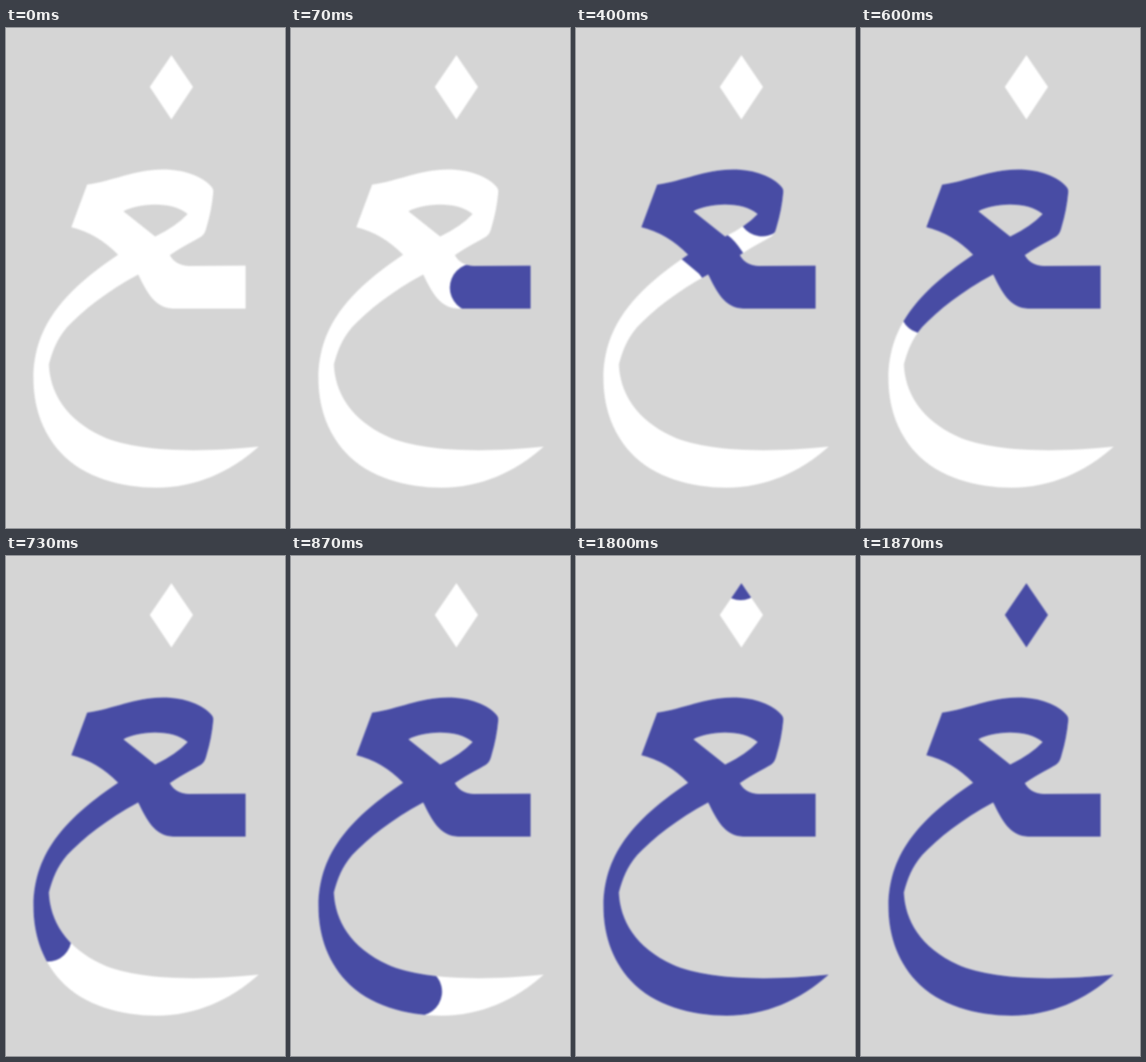
An HTML page with a canvas for the animation above (4 s loop, 361 by 645 pixels).

```html
<!DOCTYPE html>
<html lang="ar">
<head>
<meta charset="utf-8">
<title>Letter stroke order</title>
<style>
html, body { margin: 0; width: 100%; height: 100%; overflow: hidden; background: #d5d5d5; }
canvas { display: block; width: 361px; height: 645px; filter: blur(1px); }
</style>
</head>
<body>
<canvas id="stage" width="361" height="645"></canvas>
<script>
const LOOP = 4000, FPS = 15;
const PAPER = '#d5d5d5', BLANK = '#fff', INK = '#484ca4';
const ctx = document.getElementById('stage').getContext('2d');

const body = new Path2D(
  'M105 202 C140 197 165 183 203 182.500 C232 182.500 255 192 266 205 Q269 208 268 214 ' +
  'Q266 235 260 255 C257 267 255 268 245 273.500 Q225 284 212 293 Q219 306 236 307 ' +
  'L310 306.500 V362 H216 C192 361 182 340 171 318 C130 340 100 364 79 386 ' +
  'C66 401 60 417 55.500 434 C57 470 77 505 125 527 C165 545 240 549 327 540 ' +
  'C290 573 245 593 195 593 C150 593 100 580 71 548 C45 520 35.500 485 35.500 452 ' +
  'C35.500 380 82 335 145 292.500 Q118 265 84.500 257 Z ' +
  'M152 236.500 C170 226 215 222.500 235 240 Q220 256 193 269 Z');
const dot = new Path2D('M214 35 L242 76 L214 118 L186 76 Z');

// Pen route: each leg has a start, a curve and the ticks it takes.
const legs = [
  ['318 335', 'L222 335 C200 335 195 308 180 294 L113 238', 3],
  ['113 238', 'L105 234 L120 222 C145 213 170 207 200 206 C235 206 246 214 244 228 C241 252 215 252 142 300', 5],
  ['142 300', 'C118 316 100 338 82 363', 1],
  ['82 363', 'C55 395 46 420 46 450 C46 510 90 562 164 562', 4],
  ['164 562', 'C225 571 275 566 327 541', 2]
];
const route = new Path2D('M' + legs[0][0] + legs.map(l => l[1]).join(' '));
const probe = document.createElementNS('http://www.w3.org/2000/svg', 'path');
const lengths = legs.map(([from, curve]) => {
  probe.setAttribute('d', 'M' + from + ' ' + curve);
  return probe.getTotalLength();
});

function penDistance(tick) {
  let sum = 0;
  legs.forEach(([, , ticks], i) => {
    sum += lengths[i] * Math.max(0, Math.min(1, tick / ticks));
    tick -= ticks;
  });
  return sum;
}

function fill(path, color) {
  ctx.fillStyle = color;
  ctx.fill(path, 'evenodd');
}

function inside(path, paint) {
  ctx.save();
  ctx.clip(path, 'evenodd');
  paint();
  ctx.restore();
}

function drawBody(tick) {
  fill(body, BLANK);
  if (tick >= 15) fill(body, INK);
  else if (tick > 0) inside(body, () => {
    ctx.strokeStyle = INK;
    ctx.lineWidth = 62;
    ctx.lineCap = 'round';
    ctx.lineJoin = 'miter';
    ctx.setLineDash([penDistance(tick), 9999]);
    ctx.stroke(route);
  });
}

function drawDot(tick) {
  fill(dot, BLANK);
  if (tick >= 28) fill(dot, INK);
  else if (tick === 27) inside(dot, () => {
    ctx.fillStyle = INK;
    ctx.beginPath();
    ctx.arc(213, 27, 30, 0, 2 * Math.PI);
    ctx.fill();
  });
}

function frame() {
  const t = performance.now() % LOOP;
  const tick = Math.floor((t + 3.4) * FPS / 1000) % (LOOP * FPS / 1000);
  ctx.fillStyle = PAPER;
  ctx.fillRect(0, 0, 361, 645);
  drawBody(tick);
  drawDot(tick);
  requestAnimationFrame(frame);
}
frame();
</script>
</body>
</html>
```
